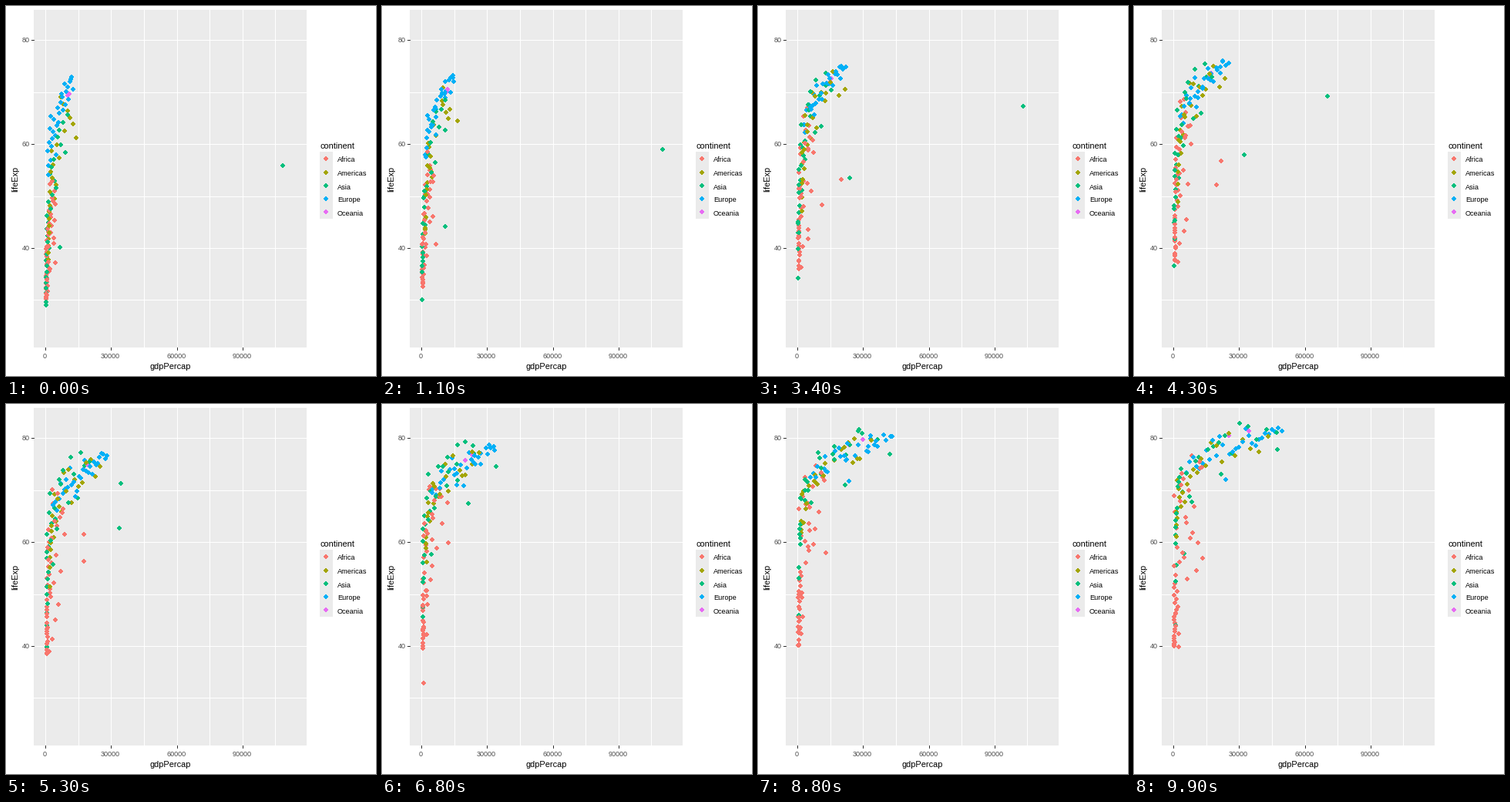
Animation of 480 by 480 pixels, one loop 10 s. Source, as a matplotlib script:

```python
import numpy as np
import matplotlib.pyplot as plt
from matplotlib.animation import FuncAnimation
from matplotlib.patches import Rectangle

SIZE, DPI, FRAMES = 480, 80, 100
PT = 72 / DPI  # points per pixel
COLORS = {"Africa": "#F8766D", "Americas": "#A3A500", "Asia": "#00BF7D",
          "Europe": "#00B0F6", "Oceania": "#E76BF3"}
GREY, DARK = "#EBEBEB", "#333333"
LEFT, TOP, RIGHT, BOTTOM = 36, 5, 390, 443
YEARS = np.arange(1952, 2008, 5)
DATES = np.array([1952, 1982, 2007])

# Dots per continent, how loosely ranks hold over time, and for each date
# the range and skew of gdp (in hundreds) and of life expectancy.
CLOUDS = {
    "Africa": (49, 0.22, [(3, 47, 2.7), (5, 86, 3.2), (3, 128, 3.5)],
               [(30, 52.7, 1.4), (38.4, 70, 1.35), (39.6, 76.4, 1.5)]),
    "Americas": (25, 0.12, [(14, 140, 2.9), (20, 250, 2.4), (12, 430, 2.4)],
                 [(37.6, 68.8, 1), (51.5, 75.8, 0.6), (60.9, 80.7, 0.7)]),
    "Asia": (31, 0.1, [(3, 99, 3.4), (4, 200, 3), (9, 471, 3.2)],
             [(28.8, 65.4, 1.2), (39.9, 77.1, 0.65), (43.8, 82.6, 0.45)]),
    "Europe": (30, 0.12, [(10, 125, 1.3), (36, 284, 1), (59, 494, 1)],
               [(53.8, 72.7, 0.7), (66, 77, 0.7), (71.8, 81.8, 0.6)]),
    "Oceania": (2, 0, [(100, 106, 1), (176, 195, 1), (252, 344, 1)],
                [(69.1, 69.4, 1), (73.8, 74.7, 1), (80.2, 81.2, 1)]),
}

# Dots that leave the crowd: (year, gdp in hundreds, life).
LONERS = [
    ("Asia", [(1952, 1084, 55.6), (1957, 1135, 58), (1967, 809, 64.6),
              (1972, 1093, 67.7), (1977, 593, 69.3), (1982, 314, 71.3),
              (1992, 349, 75.2), (2007, 473, 77.6)]),
    ("Asia", [(1952, 65, 39.9), (1967, 169, 49.9), (1977, 342, 58.7),
              (1982, 337, 63), (1987, 212, 66.3), (2007, 217, 72.8)]),
    ("Africa", [(1952, 24, 42.7), (1962, 68, 47.8), (1967, 188, 50.2),
                (1977, 220, 57.4), (1987, 118, 66.2), (2007, 121, 74)]),
    ("Africa", [(1952, 43, 37), (1972, 114, 48.7), (1977, 217, 52.8),
                (1987, 119, 60.2), (2007, 132, 56.7)]),
    ("Africa", [(1952, 5, 40), (1987, 8, 44), (1992, 7, 23.6),
                (1997, 6, 36.1), (2007, 9, 46.2)]),
]

rng = np.random.default_rng(7)


def px(gdp):
    return LEFT + (np.asarray(gdp) + 5423) * 354 / 124610


def py(life):
    return BOTTOM - (np.asarray(life) - 20.65) * 6.745


def shuffled_ranks(base, loose):
    """Ranks from 0 to 1, near base but partly reordered."""
    noisy = base + loose * rng.standard_normal(len(base))
    return noisy.argsort().argsort() / (len(base) - 1)


def spread(ranks, low, high, skew):
    return low + (high - low) * ranks ** skew


def parabola(values):
    """Values at the three dates, carried to every fifth year."""
    fit = np.polyfit(DATES - 1980, values, 2)
    return np.array([np.polyval(fit[:, i], YEARS - 1980)
                     for i in range(fit.shape[1])])


def cloud(count, loose, gdp_ranges, life_ranges):
    base = np.linspace(0, 1, count)
    gdp = [spread(shuffled_ranks(base, loose), *r) for r in gdp_ranges]
    life = [spread(shuffled_ranks(base, loose), *r) for r in life_ranges]
    return np.exp(parabola(np.log(gdp))), parabola(life)


gdp_keys, life_keys, dot_colors = [], [], []
for name, spec in CLOUDS.items():
    gdp, life = cloud(*spec)
    gdp_keys.extend(gdp)
    life_keys.extend(life)
    dot_colors += [COLORS[name]] * len(gdp)
for name, points in LONERS:
    when, gdp, life = zip(*points)
    gdp_keys.append(np.interp(YEARS, when, gdp))
    life_keys.append(np.interp(YEARS, when, life))
    dot_colors.append(COLORS[name])

order = rng.permutation(len(dot_colors))
gdp_keys = 100 * np.array(gdp_keys)[order]
life_keys = np.array(life_keys)[order]
dot_colors = [dot_colors[i] for i in order]

plt.rcParams["font.family"] = "Liberation Sans"
fig = plt.figure(figsize=(SIZE / DPI, SIZE / DPI), dpi=DPI, facecolor="white")
ax = fig.add_axes([0, 0, 1, 1])
ax.set_xlim(0, SIZE)
ax.set_ylim(SIZE, 0)
ax.axis("off")


def box(x, y, w, h):
    ax.add_patch(Rectangle((x, y), w, h, fc=GREY, lw=0, zorder=0))


def line(xs, ys, color):
    ax.plot(xs, ys, color=color, lw=PT, antialiased=False,
            solid_capstyle="butt", zorder=1)


def label(x, y, text, size=9, color="black", **kw):
    ax.text(x, y, text, fontsize=size * PT, color=color, va="baseline", **kw)


def scatter(x, y, colors):
    return ax.scatter(x, y, s=(4.1 * PT) ** 2, c=colors, edgecolors="none",
                      antialiased=False, zorder=3)


box(LEFT, TOP, RIGHT - LEFT, BOTTOM - TOP)
for g in range(0, 105001, 15000):
    x = np.floor(px(g) - 0.75) + 0.5
    line([x, x], [TOP, BOTTOM], "white")
    if g % 30000 == 0:
        line([x, x], [BOTTOM, BOTTOM + 3], DARK)
        label(x, 457, str(g), color="#4D4D4D", ha="center")
for v in range(30, 81, 10):
    y = np.ceil(py(v)) + 0.5
    line([LEFT, RIGHT], [y, y], "white")
    if v % 20 == 0:
        line([LEFT - 3, LEFT], [y, y], DARK)
        label(31, y + 3.5, str(v), color="#4D4D4D", ha="right")

label(213, 471, "gdpPercap", 11, ha="center")
label(15, 224, "lifeExp", 11, ha="center", rotation=90,
      rotation_mode="anchor")

label(407, 185, "continent", 11)
box(407, 189, 17, 87)
rows = np.round(198.3 + 17.28 * np.arange(len(COLORS)))
scatter(np.full(len(rows), 415), rows, list(COLORS.values()))
for name, y in zip(COLORS, rows):
    label(430, y + 4.5, name, 9.2)

dots = scatter(px(gdp_keys[:, 0]), py(life_keys[:, 0]), dot_colors)


def update(frame):
    pos = frame * (len(YEARS) - 1) / (FRAMES - 1)
    k = min(int(pos), len(YEARS) - 2)
    f = pos - k
    gdp = gdp_keys[:, k] * (1 - f) + gdp_keys[:, k + 1] * f
    life = life_keys[:, k] * (1 - f) + life_keys[:, k + 1] * f
    dots.set_offsets(np.column_stack([np.round(px(gdp)), np.round(py(life))]))
    return dots,


anim = FuncAnimation(fig, update, frames=FRAMES, interval=100, repeat=True,
                     repeat_delay=0, blit=False)
plt.show()
```
